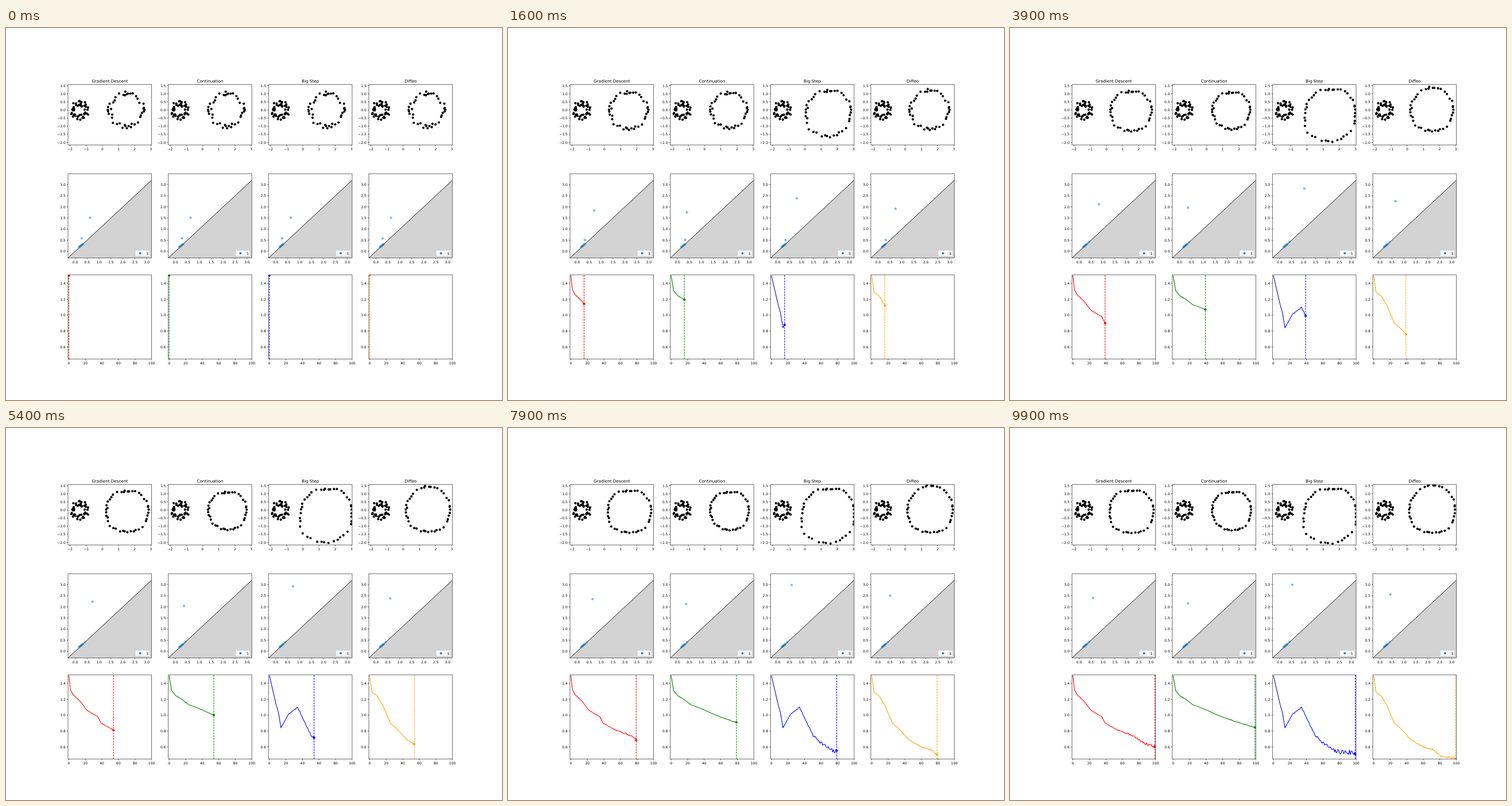
Recreate the animation shown at these times as an HTML page. Size 864 px wide and 648 px high, loop 10 s.

```html
<!DOCTYPE html>
<html lang="en">
<head>
<meta charset="utf-8">
<title>Optimiser comparison</title>
<style>
  html, body { margin: 0; width: 100%; height: 100%; overflow: hidden; background: #fff; }
  #stage { display: block; width: 864px; height: 648px; }
  text { font: 6px "DejaVu Sans", sans-serif; }
  .title { font-size: 7.2px; text-anchor: middle; }
  .mid { text-anchor: middle; }
  .end { text-anchor: end; }
  .axis { fill: none; stroke: #000; stroke-width: .6; }
  .cloud { fill: none; stroke: #000; stroke-width: 4.2; stroke-linecap: round; }
  .pair { fill: #1f77b4; fill-opacity: .5; stroke: #1f77b4; stroke-opacity: .5; stroke-width: .6; }
  .curve { fill: none; stroke-width: 1.1; stroke-linejoin: round; }
  .cursor { stroke-width: 1; stroke-dasharray: 3.33 1.44; }
</style>
</head>
<body>
<svg id="stage" viewBox="0 0 864 648"></svg>
<script>
const LEFT = 108, WIDTH = 145.565, RIGHT = LEFT + WIDTH, PITCH = 174.678;
const STEPS = 100, STEP_MS = 100, LAST = STEPS - 1;
const CENTER = [209.5, 143];

// x0/y0 are the pixel origins of each row's data space; ticks are [from, to, by, digits].
const ROWS = [
  { top: 98.4, bottom: 203.8, x0: 167.8, sx: 28.24, y0: 142.85, sy: 28.24,
    xt: [-2, 3, 1, 0], yt: [-2, 1.5, .5, 1] },
  { top: 253.87, bottom: 400.62, x0: 120.48, sx: 41.59, y0: 389, sy: 38.72,
    xt: [0, 3, .5, 1], yt: [0, 3, .5, 1] },
  { top: 429.97, bottom: 576.72, x0: 109.44, sx: 1.4412, y0: 638.5, sy: 138.3,
    xt: [0, 100, 20, 0], yt: [.6, 1.4, .2, 1] }
];

// reach: final ring radius every 45 degrees, clockwise from the right.
// rate: how fast the ring settles. rise: final height of the far pair.
// drift and loss: key points over the steps. noise: roughness of the late loss.
const METHODS = [
  { name: "Gradient Descent", color: "red", rate: .025, rise: 296, noise: .02,
    reach: [40, 43.5, 39.5, 41, 35, 37, 33.5, 39.5],
    drift: [[0, 146.6], [39, 155], [54, 150.5], [99, 144.7]],
    loss: [[0, 1.5], [2, 1.32], [5, 1.26], [14, 1.17], [22, 1.06], [35, .98], [39, .9], [54, .815], [72, .745], [86, .645], [99, .605]] },
  { name: "Continuation", color: "green", rate: .027, rise: 305.5, noise: .006,
    reach: [35, 38, 35, 33.5, 31.5, 33, 31, 36.5],
    drift: [[0, 146.6], [16, 137], [39, 135.5]],
    loss: [[0, 1.5], [3, 1.31], [8, 1.245], [16, 1.195], [24, 1.13], [36, 1.085], [54, 1], [75, .92], [99, .845]] },
  { name: "Big Step", color: "blue", rate: .055, rise: 273, noise: .05,
    reach: [43, 53, 58, 59, 45, 41.5, 36.5, 43],
    drift: [[0, 146.6], [39, 163.4], [54, 150.6], [89, 142.4]],
    loss: [[0, 1.5], [8, 1.14], [11, 1.03], [14, .84], [23, 1.01], [34, 1.1], [50, .75], [61, .645], [74, .545], [99, .525]] },
  { name: "Diffeo", color: "orange", rate: .028, rise: 290, noise: .015,
    reach: [41, 44, 39, 40.5, 37.5, 39, 43.5, 44],
    drift: [[0, 146.6], [16, 151], [99, 138.5]],
    loss: [[0, 1.5], [3, 1.285], [9, 1.245], [16, 1.12], [25, .9], [33, .83], [45, .69], [60, .6], [72, .565], [80, .49], [99, .455]] }
];

const stage = document.getElementById("stage");

function set(el, attrs) {
  for (const key in attrs) el.setAttribute(key, attrs[key]);
}

function add(parent, tag, attrs, text) {
  const el = document.createElementNS("http://www.w3.org/2000/svg", tag);
  set(el, attrs);
  if (text !== undefined) el.textContent = text;
  return parent.appendChild(el);
}

const lerp = (a, b, t) => a + (b - a) * t;
const polar = (cx, cy, r, a) => [cx + r * Math.cos(a), cy + r * Math.sin(a)];
const dots = points => points.map(([x, y]) => `M${x.toFixed(2)} ${y.toFixed(2)}h0`).join("");

// Seeded noise in -1..1.
function noise(seed) {
  return () => {
    seed = (seed * 1664525 + 1013904223) % 4294967296;
    return seed / 2147483648 - 1;
  };
}

// Piecewise linear through [step, value] points; holds the last value.
function sample(points, k) {
  const i = points.findIndex(p => p[0] > k);
  if (i < 0) return points[points.length - 1][1];
  const [a, b] = [points[i - 1], points[i]];
  return lerp(a[1], b[1], (k - a[0]) / (b[0] - a[0]));
}

// Smooth closed radius through evenly spaced values.
function radiusAt(reach, angle) {
  const n = reach.length;
  const turn = ((angle / (2 * Math.PI)) % 1 + 1) % 1 * n;
  const i = Math.floor(turn);
  const ease = (1 - Math.cos((turn - i) * Math.PI)) / 2;
  return lerp(reach[i % n], reach[(i + 1) % n], ease);
}

function makeBlob(count) {
  const rand = noise(11);
  return Array.from({ length: count }, (_, i) =>
    polar(127, 143.5, 12.8 + 5 * rand(), i * 2.4 + .3 * rand()));
}

// Evenly turned points with a little scatter; they start bunched near the four sides.
function makeRing(count) {
  const rand = noise(29);
  return Array.from({ length: count }, (_, i) => ({
    angle: (i + .4 * rand()) / count * 2 * Math.PI,
    offset: 3.5 * rand()
  }));
}

const BLOB = makeBlob(48), RING = makeRing(42);

function ringPoint({ angle, offset }, reach, p) {
  const bunch = lerp(.15, .06, p);
  const a = angle - bunch * Math.sin(4 * angle);
  const r = lerp(29 + offset, radiusAt(reach, a) + offset * .25, p);
  return polar(...CENTER, r, a);
}

function drawAxes(g, row) {
  const each = ([from, to, by, digits], draw) => {
    for (let v = from; v < to + by / 2; v += by) draw(v, v.toFixed(digits).replace("-", "\u2212"));
  };
  let d = `M${LEFT} ${row.top}H${RIGHT}V${row.bottom}H${LEFT}Z`;
  each(row.xt, (v, label) => {
    const x = row.x0 + v * row.sx;
    d += `M${x} ${row.bottom}v2.1`;
    add(g, "text", { x, y: row.bottom + 9, class: "mid" }, label);
  });
  each(row.yt, (v, label) => {
    const y = row.y0 - v * row.sy;
    d += `M${LEFT} ${y}h-2.1`;
    add(g, "text", { x: LEFT - 4.2, y: y + 2.2, class: "end" }, label);
  });
  add(g, "path", { d, class: "axis" });
}

function drawLegend(g) {
  add(g, "rect", { x: 225.2, y: 387.2, width: 25.4, height: 10.4, rx: 1.2,
    fill: "#fff", "fill-opacity": .8, stroke: "#ccc", "stroke-width": .6 });
  add(g, "circle", { cx: 233.7, cy: 392.6, r: 2, fill: "#1f77b4", "fill-opacity": .9 });
  add(g, "text", { x: 244.4, y: 394.5 }, "1");
}

function buildCloud(g, { reach }) {
  add(g, "path", { d: dots(BLOB), class: "cloud" });
  const ring = add(g, "path", { class: "cloud" });
  return (k, p) => ring.setAttribute("d", dots(RING.map(point => ringPoint(point, reach, p))));
}

function buildDiagram(g, { drift, rise }) {
  const { bottom, sy } = ROWS[1], peak = bottom - 3.5 * sy;
  const pair = (cx, cy) => add(g, "circle", { cx, cy, r: 1.8, class: "pair" });
  add(g, "path", { d: `M${LEFT} ${bottom}L${RIGHT} ${peak}V${bottom}Z`, fill: "#d3d3d3" });
  add(g, "path", { d: `M${LEFT} ${bottom}L${RIGHT} ${peak}`, stroke: "#000", "stroke-width": .9 });
  for (let i = 0; i < 7; i++) pair(127.2 + 1.1 * i, 381.9 - .92 * i);
  const far = pair(0, 0), near = pair(0, 0);
  drawLegend(g);
  return (k, p) => {
    const t = Math.min(1, k / 39);
    set(far, { cx: sample(drift, k), cy: lerp(330.5, rise, p) });
    set(near, { cx: lerp(131.8, 137.2, t), cy: lerp(366.5, 373, t) });
  };
}

function buildChart(g, { color, loss, noise: rough }, seed) {
  const row = ROWS[2], rand = noise(seed);
  const points = Array.from({ length: STEPS }, (_, k) => [
    row.x0 + k * row.sx,
    row.y0 - row.sy * (sample(loss, k) + rough * rand() * (k / LAST) ** 2)
  ]);
  const curve = add(g, "path", { class: "curve", stroke: color });
  const cursor = add(g, "line", { class: "cursor", stroke: color, y1: row.bottom, y2: row.top });
  const head = add(g, "circle", { r: 2.1, fill: color });
  return k => {
    const [x, y] = points[k];
    curve.setAttribute("d", "M" + points.slice(0, k + 1).map(p => p.join(" ")).join("L"));
    set(cursor, { x1: x, x2: x });
    set(head, { cx: x, cy: y });
  };
}

function buildColumn(method, index) {
  const g = add(stage, "g", { transform: `translate(${index * PITCH} 0)` });
  const [cloud, diagram, chart] = ROWS.map(({ top, bottom }) => add(g, "svg", {
    x: LEFT, y: top, width: WIDTH, height: bottom - top,
    viewBox: `${LEFT} ${top} ${WIDTH} ${bottom - top}`
  }));
  ROWS.forEach(row => drawAxes(g, row));
  add(g, "text", { x: LEFT + WIDTH / 2, y: 95, class: "title" }, method.name);

  const parts = [buildCloud(cloud, method), buildDiagram(diagram, method), buildChart(chart, method, index + 5)];
  const settle = k => 1 - Math.exp(-k * method.rate);
  return k => parts.forEach(update => update(k, settle(k) / settle(LAST)));
}

const updates = METHODS.map(buildColumn);
let shown = -1;

function tick() {
  const k = Math.floor(performance.now() / STEP_MS) % STEPS;
  if (k !== shown) {
    shown = k;
    updates.forEach(update => update(k));
  }
  requestAnimationFrame(tick);
}
tick();
</script>
</body>
</html>
```
